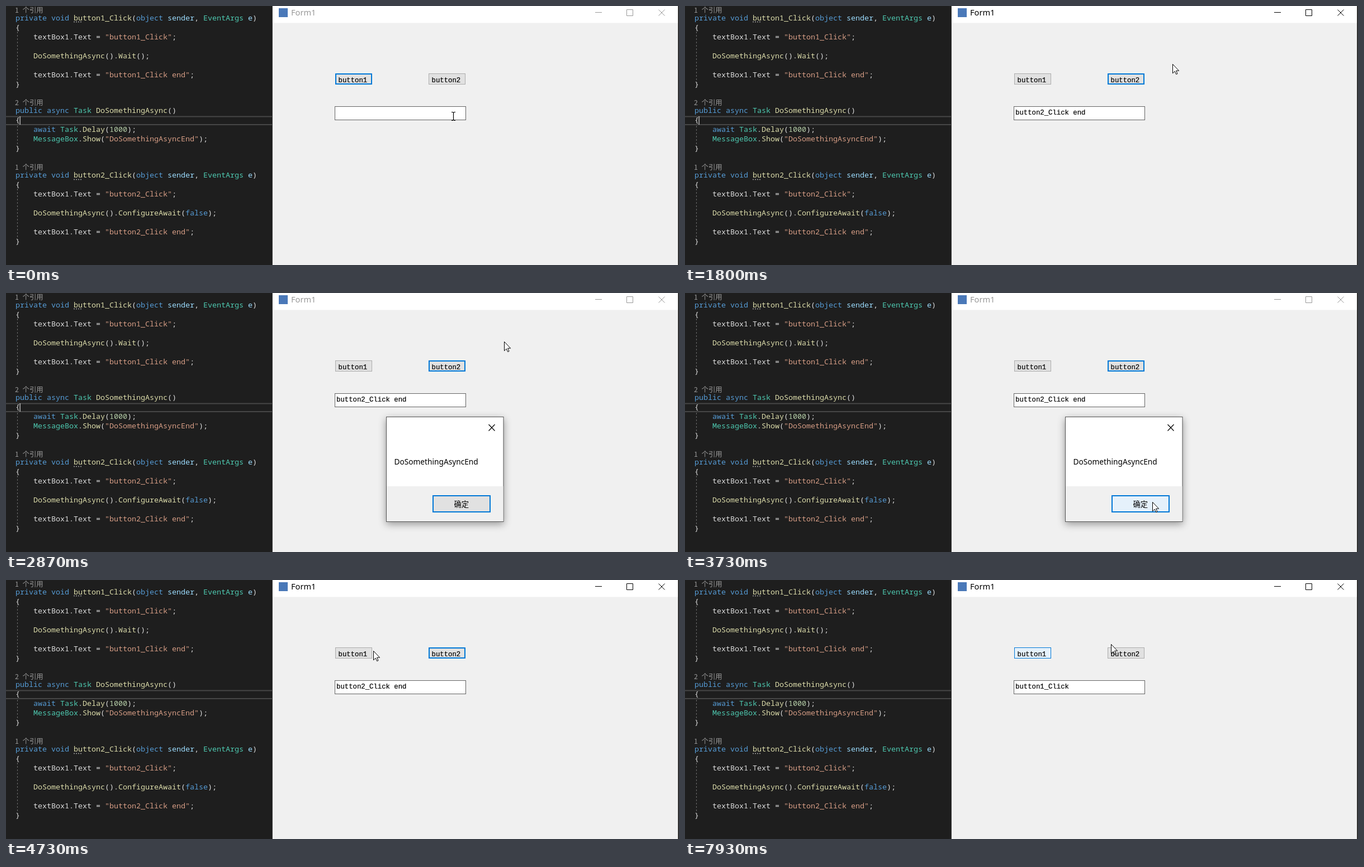
Write an HTML page that moves like this. It is 1204 px wide and 465 px high and loops after 8 s.

```html
<!DOCTYPE html>
<html lang="zh">
<head>
<meta charset="utf-8">
<title>Form1</title>
<style>
html, body { margin: 0; width: 100%; height: 100%; overflow: hidden; background: #1e1e1e; }
svg { display: block; width: 1204px; height: 465px; }
text { white-space: pre; }
.code { font: 500 13.333px "Noto Sans Mono", monospace; fill: #dcdcdc; }
.lens { font: 12.4px "Noto Sans CJK SC", "Noto Sans CJK", sans-serif; fill: #999; }
.ui { font: 12.3px "Liberation Mono", monospace; fill: #000; stroke: #000; stroke-width: .2; }
.title { font: 14.6px "Noto Sans", sans-serif; }
.msg { font: 13.7px "Noto Sans", sans-serif; }
.ok { font: 13.3px "Noto Sans CJK SC", "Noto Sans CJK", sans-serif; }
.str { fill: #d69d85; } .key { fill: #569cd6; } .type { fill: #4ec9b0; }
.arg { fill: #9cdcfe; } .fn { fill: #dcdcaa; } .num { fill: #b5cea8; }
</style>
</head>
<body>
<svg viewBox="0 0 1204 465">
  <rect width="1204" height="465" fill="#1e1e1e"/>
  <path d="M0 198.5H477M0 213H477" stroke="#464646" stroke-width="2"/>
  <path d="M20.5 46V133M20.5 215V248M20.5 328V416" stroke="#6c6c6c" stroke-dasharray="3 3"/>
  <path d="M121 28.5H136M121 311.5H136" stroke="#a0a0a0" stroke-width="1.6" stroke-dasharray="2 2"/>
  <g id="code"></g>
  <rect id="caret" x="24.5" y="198" width="1.2" height="15" fill="#dcdcdc"/>

  <rect x="476.5" y="-1" width="726" height="467" fill="#f0f0f0" stroke="#484848"/>
  <rect x="477" width="725" height="30.5" fill="#fff"/>
  <rect x="488" y="4" width="16" height="16" fill="#4a78b8"/>
  <g id="bar" fill="none" stroke="currentColor">
    <text class="title" x="510" y="17" fill="currentColor" stroke="none">Form1</text>
    <path d="M1054 11.5H1066M1110.5 6.5H1121.5V17.5H1110.5ZM1167.5 6.5L1178.5 17.5M1178.5 6.5L1167.5 17.5"/>
  </g>
  <rect id="b1"/><text class="ui" x="594.5" y="137">button1</text>
  <rect id="b2"/><text class="ui" x="761.5" y="137">button2</text>
  <rect x="588.5" y="180.5" width="234" height="24" fill="#fff" stroke="#646464"/>
  <text id="field" class="ui" x="591" y="195"></text>

  <g id="dialog">
    <rect x="680.5" y="222.5" width="209.5" height="188" fill="#fff" stroke="#555"
      style="filter:drop-shadow(0 4px 7px rgba(0,0,0,.38))"/>
    <rect x="681" y="347" width="208.5" height="63" fill="#f0f0f0"/>
    <path id="close" d="M863.5 236L874.5 247.5M874.5 236L863.5 247.5" stroke="#000" stroke-width="1.2"/>
    <text class="msg" x="694.5" y="308">DoSomethingAsyncEnd</text>
    <rect id="ok"/><text class="ok" x="801.5" y="383.5">确定</text>
  </g>

  <g id="pointer">
    <path id="arrow" d="M.5 .5V16.8L4.2 13.2L6.7 18.6L9 17.6L6.6 12.2H11.6Z" fill="#fff" stroke="#000"/>
    <path id="beam" d="M-3 -7.5H-1L.5 -6.5L2 -7.5H4M.5 -6.5V6.5M-3 7.5H-1L.5 6.5L2 7.5H4" fill="none" stroke="#000" stroke-width="1.2"/>
    <g id="busy" fill="none">
      <circle cx="-.5" r="7.3" stroke="#1c8ade" stroke-width="5.4"/>
      <circle cx="-.5" r="6.4" stroke="#8cc6f2" stroke-width="2.4" stroke-dasharray="1.5 1.5"/>
    </g>
  </g>
</svg>
<script>
const LOOP = 8000, STEP = 1000 / 15;
const $ = id => document.getElementById(id);
const set = (id, attrs) => { for (const k in attrs) $(id).setAttribute(k, attrs[k]); };
const show = (id, on) => set(id, { visibility: on ? 'inherit' : 'hidden' });

// code listing
const kinds = ['str', 'key', 'type', 'arg', 'fn', 'num'];
const tokens = /("[^"]*")|\b(private|public|void|object|async|await|false)\b|\b(Task|EventArgs|MessageBox)\b|\b(sender|e)\b|\b(\w+(?=\())|\b(\d+)\b/g;
const paint = line => line.replace(tokens, (word, ...groups) =>
  `<tspan class="${kinds[groups.findIndex(g => g)]}">${word}</tspan>`);

function block(top, refs, lines) {
  const lens = `<text class="lens" y="${top - 14.5}"><tspan x="16">${refs}</tspan><tspan x="29.5">个引用</tspan></text>`;
  return lens + lines.map((line, i) =>
    `<text class="code" x="17" y="${top + i * 16.95}">${paint(line)}</text>`).join('');
}
const handler = (name, call) => [
  `private void ${name}(object sender, EventArgs e)`, '{',
  `    textBox1.Text = "${name}";`, '',
  `    DoSomethingAsync().${call};`, '',
  `    textBox1.Text = "${name} end";`, '}'];
$('code').innerHTML =
  block(26, 1, handler('button1_Click', 'Wait()')) +
  block(192.3, 2, ['public async Task DoSomethingAsync()', '{',
    '    await Task.Delay(1000);', '    MessageBox.Show("DoSomethingAsyncEnd");', '}']) +
  block(308.3, 1, handler('button2_Click', 'ConfigureAwait(false)'));

// buttons: fill, border colour, border width
const looks = {
  normal: ['#e1e1e1', '#adadad', 1],
  focus: ['#e1e1e1', '#0078d7', 2],
  hover: ['#e5f1fb', '#0078d7', 1],
  focusHover: ['#e5f1fb', '#0078d7', 2],
  down: ['#cce4f7', '#005499', 1]
};
const boxes = { b1: [589, 121, 66, 20], b2: [756, 121, 66, 20], ok: [763, 363, 104, 31] };
function button(id, look) {
  const [fill, stroke, w] = looks[look], [x, y, width, height] = boxes[id];
  set(id, { fill, stroke, 'stroke-width': w, x: x + w / 2, y: y + w / 2, width: width - w, height: height - w });
}
const over = (id, [px, py]) => {
  const [x, y, w, h] = boxes[id];
  return px >= x && px < x + w && py >= y && py < y + h;
};

// pointer path: time, x, y
const path = [
  [0, 800, 198], [800, 801, 132], [1530, 801, 132], [1800, 872, 104], [2067, 872, 104],
  [2330, 891, 87], [3133, 891, 87], [3400, 836, 373], [3533, 836, 373], [3930, 836, 377],
  [4070, 836, 377], [4400, 811, 165], [4600, 750, 117], [4800, 625, 130], [5200, 625, 130],
  [5530, 735, 86], [7930, 735, 86], [7930, 762, 115], [LOOP, 762, 115]
];
function pointerAt(t) {
  const i = path.findIndex(p => p[0] > t);
  const [t0, x0, y0] = path[i - 1], [t1, x1, y1] = path[i];
  const u = (t - t0) / (t1 - t0), k = u * u * (3 - 2 * u);
  return [x0 + (x1 - x0) * k, y0 + (y1 - y0) * k];
}

function draw(time) {
  const t = Math.floor((time + 4) / STEP) * STEP;   // screen is refreshed 15 times a second
  const from = (a, b) => t >= a - 4 && t < b - 4;
  const pos = pointerAt(t);

  show('caret', (t - 630 + 1060) % 1060 < 530);
  set('bar', { color: from(1333, 2600) || from(4067, LOOP + 9) ? '#000' : '#999' });

  let b1 = 'normal', b2 = 'normal';
  if (t < 1330) {
    b1 = 'focus';
    if (over('b2', pos)) b2 = 'hover';
  } else if (t < 4796) {
    b2 = from(1333, 1467) ? 'down' : over('b2', pos) && t < 2600 ? 'focusHover' : 'focus';
    if (over('b1', pos)) b1 = 'hover';
  } else {
    b1 = from(4800, 4933) ? 'down' : 'hover';
  }
  button('b1', b1);
  button('b2', b2);
  $('field').textContent = t < 1463 ? '' : t < 4929 ? 'button2_Click end' : 'button1_Click';

  const opening = Math.min(1, (t - 2533) / 267), closing = Math.max(0, (t - 4000) / 267);
  const alpha = Math.min(opening, 1 - closing);
  const scale = t < 3000 ? .9 + .1 * opening : 1 - .04 * closing;
  show('dialog', from(2600, 4267));
  set('dialog', {
    opacity: Math.max(0, alpha),
    transform: `translate(785.3 316.5) scale(${scale}) translate(-785.3 -316.5)`
  });
  show('close', from(2600, 4067));
  button('ok', from(3933, 4267) ? 'down' : over('ok', pos) ? 'focusHover' : 'focus');

  const busy = from(2533, 2600);
  const beam = !busy && pos[0] > 588 && pos[0] < 822 && pos[1] > 180 && pos[1] < 205;
  show('busy', busy);
  show('beam', beam);
  show('arrow', !busy && !beam);
  set('pointer', { transform: `translate(${Math.round(pos[0])} ${Math.round(pos[1])})` });
}

const start = performance.now();
(function tick() {
  draw((performance.now() - start) % LOOP);
  requestAnimationFrame(tick);
})();
</script>
</body>
</html>
```
